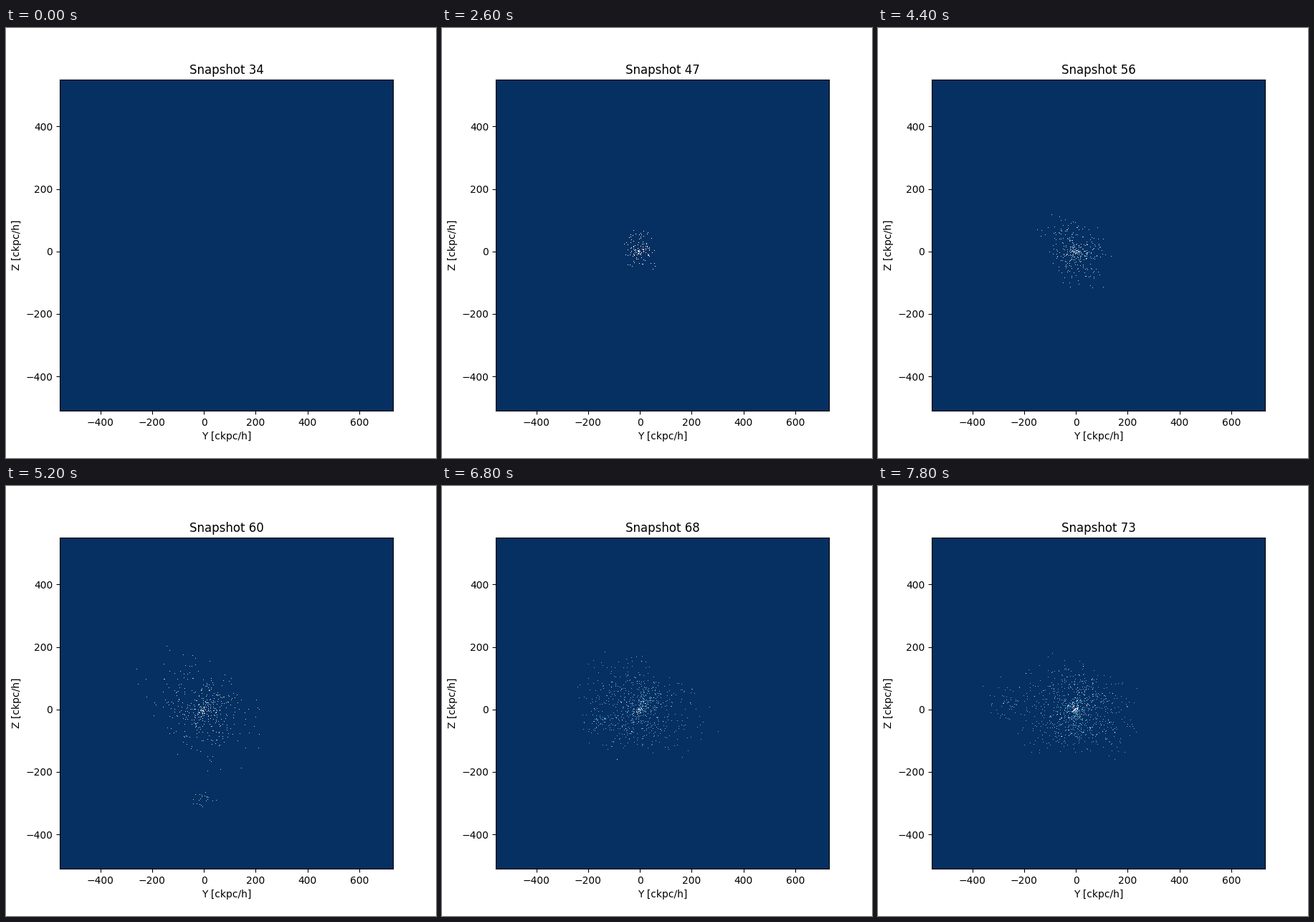
These frames come from a looping animation (600 by 600 pixels, 8 s). A matplotlib script:

```python
import numpy as np
import matplotlib.pyplot as plt
from matplotlib.animation import FuncAnimation

FRAMES, STEP = 40, 200
FIRST = 34
COLS, ROWS = 465, 462            # one histogram bin per screen pixel
CX, CY = 201.2, 239.8            # bin position of the coordinate origin
EXTENT = (-556.5, 730.0, -509.7, 549.9)
TOTAL = 1000

rng = np.random.default_rng(12)
ids = np.arange(TOTAL)
theta0 = rng.uniform(0, 2 * np.pi, TOTAL)
spin = rng.uniform(0.1, 0.5, TOTAL) * rng.choice([-1, 1], TOTAL)
phase = rng.random(TOTAL)
pulse = rng.uniform(0.02, 0.06, TOTAL)
reach = rng.uniform(0.55, 1.15, TOTAL)
scatter = rng.normal(0, 1, (TOTAL, 2))
clump = (ids > 100) & (ids % 16 == 3)
pairs = ids[40::40]
seeds = np.array([[0, -1], [1, 0], [-16, 34], [-6, 36]])


def smooth(u):
    u = np.clip(u, 0, 1)
    return u * u * (3 - 2 * u)


def outline(t, theta):
    """Lobed, slowly turning edge of the cloud, in pixels."""
    size = 28 + 52 * smooth((t - 2.6) / 3.8)
    splash = 1 + 0.25 * np.exp(-((t - 5.4) / 0.3) ** 2)
    axis = np.radians(90 + 12.5 * (t - 1.6))
    lobes = 1 + 0.2 * np.cos(2 * (theta - axis)) + 0.1 * np.cos(3 * theta + t)
    return size * splash * lobes


def clump_centre(s):
    """Infalling clump: damped swing through the centre while drifting left."""
    return np.array([-2 - 36 * s, 124 * np.cos(np.pi * s) * np.exp(-0.55 * s)])


def positions(i):
    t = i * STEP / 1000
    theta = theta0 + spin * i
    swing = 2 * np.abs((phase + pulse * i) % 1 - 0.5)
    r = outline(t, theta) * reach * swing
    pos = np.column_stack([r * np.cos(theta), -r * np.sin(theta)])
    s = t - 5.2
    if s > -0.5:
        pos[clump] = clump_centre(s) + scatter[clump] * (8 + 2.5 * s)
    mix = min(t / 1.2, 1)
    pos[:4] = seeds * (1 - mix) + pos[:4] * mix
    pos[pairs] = pos[pairs - 1]
    return pos[:int(4 + 14 * t * (t + 1))]


def density(i):
    x, y = positions(i).T
    grid, _, _ = np.histogram2d(y + CY, x + CX, bins=(ROWS, COLS),
                                range=((0, ROWS), (0, COLS)))
    peak = 1 + (i + 4) // 12
    return np.minimum(grid / peak, 1)


fig, ax = plt.subplots(figsize=(6, 6), dpi=100)
fig.subplots_adjust(left=0.125, right=0.9, bottom=0.11, top=0.88)
image = ax.imshow(np.zeros((ROWS, COLS)), cmap="RdBu_r", vmin=0, vmax=1,
                  extent=EXTENT, aspect="auto", interpolation="nearest")
ax.set_xlabel("Y [ckpc/h]")
ax.set_ylabel("Z [ckpc/h]")
title = ax.set_title("")


def draw(i):
    image.set_data(density(i))
    title.set_text(f"Snapshot {FIRST + i}")
    return image, title


anim = FuncAnimation(fig, draw, frames=FRAMES, interval=STEP,
                     init_func=lambda: draw(0), repeat=True, repeat_delay=0)
plt.show()
```
